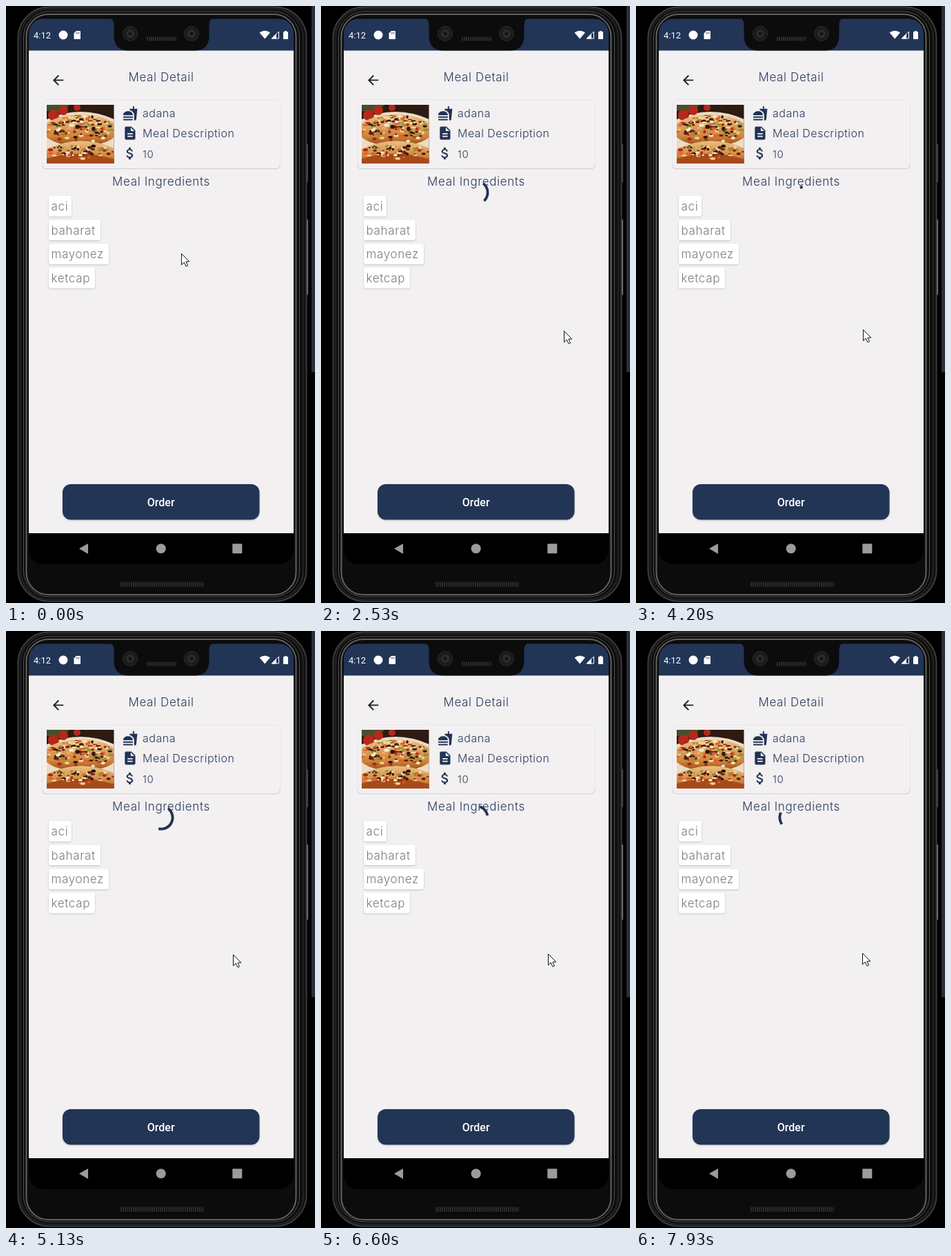
Animation of 448 by 864 pixels, one loop 8000 ms. Source, as an HTML page:

```html
<!DOCTYPE html>
<html lang="en">
<head>
<meta charset="utf-8">
<title>Meal Detail</title>
<style>
  html, body { margin: 0; width: 100%; height: 100%; overflow: hidden; background: #000; }
  svg { display: block; width: 100%; height: 100%; }
  .text { font: 300 17px Inter, sans-serif; letter-spacing: .65px; fill: #2b3b5c; }
  .small { font-size: 16px; letter-spacing: .5px; }
  .chip { fill: #7c7c7e; }
  .system { font-family: Roboto, sans-serif; fill: #fff; }
  .middle { text-anchor: middle; }
</style>
</head>
<body>
<svg viewBox="0 0 448 864">
  <defs>
    <filter id="shadow" x="-10%" y="-20%" width="120%" height="150%">
      <feDropShadow dx="0" dy="1" stdDeviation=".8" flood-opacity=".22"/>
    </filter>
    <clipPath id="screen"><rect x="33" y="18.500" width="384" height="789.500" rx="21"/></clipPath>
    <clipPath id="photo"><rect x="59" y="143" width="97.500" height="85"/></clipPath>
    <linearGradient id="crust" x2="0" y2="1">
      <stop stop-color="#e9c184"/><stop offset=".7" stop-color="#cf8238"/><stop offset="1" stop-color="#8b4216"/>
    </linearGradient>
  </defs>

  <!-- Phone body -->
  <rect width="448" height="864"/>
  <rect x="443" width="5" height="530" fill="#29303b"/>
  <rect x="434" y="200" width="4" height="55" rx="1" fill="#444"/>
  <rect x="434" y="309" width="4" height="109" rx="1" fill="#777"/>
  <g fill="#0c0c0c">
    <rect x="17.500" y="1.500" width="418" height="860" rx="45" stroke="#3c3c3c" stroke-width="2"/>
    <rect x="21" y="4" width="410" height="855" rx="42" stroke="#1f1f1f" stroke-width="3"/>
    <rect x="25.500" y="8" width="400" height="847" rx="37" stroke="#555"/>
    <rect x="29.500" y="12" width="391" height="840" rx="32" stroke="#626262" stroke-width="2"/>
  </g>
  <path d="M166 837H287" stroke="#2b2b2b" stroke-width="7" stroke-dasharray="2 1"/>

  <!-- Screen and status bar -->
  <g clip-path="url(#screen)">
    <rect x="33" y="18" width="384" height="790"/>
    <rect x="33" y="18" width="384" height="47" fill="#223557"/>
    <rect x="33" y="64.500" width="384" height="698.500" fill="#f2f0f1"/>
  </g>
  <path d="M150 17Q156.500 19 156.500 28V43Q156.500 64.500 178 64.500H273Q294.500 64.500 294.500 43V28Q294.500 19 301 17Z" fill="#0c0c0c"/>
  <g id="cameras"></g>
  <path d="M204 47.500H247" stroke="#2c2c2c" stroke-width="6" stroke-dasharray="2 1"/>
  <text class="system" x="40" y="46.500" font-size="13">4:12</text>
  <g fill="#fff">
    <circle cx="83" cy="42" r="6.500"/>
    <path d="M102 36H107Q108 36 108 37V47Q108 48 107 48H99.500Q98.500 48 98.500 47V39.500Z"/>
    <path d="M367.500 38.500Q375.500 33 383 38.500L375.300 47.500Z"/>
    <path d="M384.500 47.500L392 40V47.500Z"/>
    <path d="M395.500 37V47H385.500Z" fill="none" stroke="#fff"/>
    <path d="M404 36H407V37.300H409V48H402V37.300H404Z"/>
  </g>
  <path d="M102 38v2.500M104 38v2.500M106 38v2.500" stroke="#223557" stroke-width=".8"/>

  <!-- Navigation bar -->
  <g fill="#9b9b9b">
    <path d="M106 785.300L119 778V793Z"/>
    <circle cx="224.700" cy="785.300" r="7"/>
    <rect x="328.300" y="778.300" width="14" height="14" rx="1"/>
  </g>

  <!-- Header and meal card -->
  <path transform="translate(64.200 96)scale(.95)" fill="#202024"
    d="M20 11H7.830l5.590-5.590L12 4l-8 8 8 8 1.410-1.410L7.830 13H20z"/>
  <text class="text middle" x="225" y="109">Meal Detail</text>
  <rect x="52.500" y="135.500" width="345" height="100" rx="6" fill="#f2f0f1" stroke="#e8e6e8"/>
  <path d="M53 230Q53 235.500 58 235.500H392Q397 235.500 397 230" fill="none" stroke="#cfcdd0"/>
  <g id="pizza" clip-path="url(#photo)">
    <rect x="59" y="143" width="98" height="85" fill="#2d1a11"/>
    <path d="M59 143H92L82 154 59 152Z" fill="#44502a"/>
    <path d="M59 164Q108 142 157 164V214H59Z" fill="#eadcc6"/>
    <g fill="#b5281a">
      <circle cx="69" cy="158" r="8"/><circle cx="83" cy="151" r="7"/><circle cx="103" cy="147" r="5"/>
    </g>
    <ellipse cx="108" cy="180" rx="54" ry="23" fill="url(#crust)"/>
    <path d="M59 207Q108 184 157 206V228H59Z" fill="url(#crust)"/>
    <path d="M59 221Q108 206 157 222V228H59Z" fill="#a84a1a"/>
  </g>
  <g fill="#223455">
    <path transform="translate(169 144)scale(.93)"
      d="M18.060 22.990h1.660c.84 0 1.530-.64 1.630-1.460L23 5.050h-5V1h-1.970v4.050h-4.970l.3 2.340c1.710.47 3.310 1.320 4.270 2.260 1.440 1.420 2.430 2.890 2.430 5.290zM1 21.990V21h15.030v.99c0 .55-.45 1-1.010 1H2.010c-.56 0-1.010-.45-1.010-1zm15.030-7c0-8-15.030-8-15.030 0zM1.020 17h15v2h-15z"/>
    <path transform="translate(168.500 172.500)scale(.95)"
      d="M14 2H6c-1.100 0-2 .9-2 2v16c0 1.100.9 2 2 2h12c1.100 0 2-.9 2-2V8zm2 16H8v-2h8zm0-4H8v-2h8zm-3-5V3.500L18.500 9z"/>
    <path transform="translate(168.500 202)scale(.95)"
      d="M11.800 10.900c-2.270-.59-3-1.200-3-2.150 0-1.090 1.010-1.850 2.700-1.850 1.780 0 2.440.85 2.500 2.100h2.210c-.07-1.720-1.120-3.300-3.210-3.810V3h-3v2.160c-1.940.42-3.500 1.680-3.500 3.610 0 2.310 1.910 3.460 4.700 4.130 2.500.6 3 1.480 3 2.410 0 .69-.49 1.790-2.700 1.790-2.060 0-2.870-.92-2.980-2.100h-2.200c.12 2.190 1.760 3.420 3.680 3.830V21h3v-2.150c1.950-.37 3.500-1.500 3.500-3.550 0-2.840-2.430-3.810-4.700-4.400z"/>
  </g>
  <text class="text small" x="198" y="161">adana</text>
  <text class="text small" x="198" y="190">Meal Description</text>
  <text class="text small" x="198" y="219.500" style="font-size:15px">10</text>

  <text class="text middle" x="225" y="260">Meal Ingredients</text>
  <g id="chips"></g>

  <rect x="82" y="692" width="285.500" height="51.500" rx="12" fill="#223455" filter="url(#shadow)"/>
  <text class="system middle" x="224.700" y="724" font-size="16" font-weight="500">Order</text>

  <path id="spinner" fill="none" stroke="#223455" stroke-width="3.800" stroke-linecap="square"/>
  <path id="cursor" d="M.5.500V16.500L4.300 13 7 18.800 9.500 17.700 6.900 12H11.800Z" fill="#fff" stroke="#111"/>
</svg>
<script>
const LOOP = 8000, FRAME = 1000 / 15;
const byId = id => document.getElementById(id);
const add = (parent, markup) => byId(parent).insertAdjacentHTML('beforeend', markup);

for (const x of [180, 269]) {
  add('cameras', `<circle cx="${x}" cy="40" r="10.500" fill="#1b1b1b" stroke="#2b2b2b"/>
    <circle cx="${x}" cy="40" r="6" fill="#2c2c2c"/><circle cx="${x}" cy="40" r="2.500" fill="#141414"/>`);
}

[['aci', 33], ['baharat', 75], ['mayonez', 87], ['ketcap', 67]].forEach(([label, width], i) => {
  const y = 275 + i * 34.6;
  add('chips', `<rect x="62" y="${y}" width="${width}" height="29.500" rx="3" fill="#fff" filter="url(#shadow)"/>
    <text class="text chip" x="65.500" y="${y + 21}">${label}</text>`);
});

// Toppings scattered over both pizzas
let seed = 7;
const random = () => (seed = seed * 16807 % 2147483647) / 2147483647;
const toppings = ['#a92b18', '#f0d08c', '#24130f', '#f6e6c4', '#8a9433', '#5c2016', '#d9672c'];
for (let i = 0; i < 210; i++) {
  const angle = random() * 2 * Math.PI, reach = Math.sqrt(random());
  const upper = i % 3;
  const x = 108 + Math.cos(angle) * reach * 49;
  const y = (upper ? 178 : 211) + Math.sin(angle) * reach * (upper ? 19 : 10);
  add('pizza', `<ellipse cx="${x}" cy="${y}" rx="${1.3 + random() * 2.6}" ry="${.9 + random() * 1.4}"
    fill="${toppings[i % toppings.length]}"/>`);
}

// Eased value at x of a cubic bezier from (0,0) to (1,1)
function bezier(x1, y1, x2, y2, x) {
  const at = (a, b, u) => 3 * (1 - u) ** 2 * u * a + 3 * (1 - u) * u * u * b + u ** 3;
  let low = 0, high = 1;
  for (let i = 0; i < 20; i++) {
    const mid = (low + high) / 2;
    if (at(x1, x2, mid) < x) low = mid; else high = mid;
  }
  return at(y1, y2, low);
}

const SPIN_START = 1575, SPIN_CYCLE = 1333, SPIN_TURN = 2222;

function spinnerPath(time) {
  const age = time - SPIN_START;
  if (age < 0) return '';
  const phase = age / SPIN_CYCLE % 1;
  const tail = phase < .5 ? 0 : bezier(.4, 0, .2, 1, phase * 2 - 1);
  const head = phase < .5 ? bezier(.4, 0, .2, 1, phase * 2) : 1;
  const base = 90 * phase + 360 * age / SPIN_TURN;
  const point = degrees => {
    const a = degrees * Math.PI / 180;
    return `${225 + 16.6 * Math.sin(a)} ${270 - 16.6 * Math.cos(a)}`;
  };
  const sweep = Math.max(.5, 270 * (head - tail));
  const start = base + 270 * tail;
  return `M${point(start)}A16.6 16.6 0 ${sweep > 180 ? 1 : 0} 1 ${point(start + sweep)}`;
}

// Pointer stops: time, x, y
const stops = [
  [0, 254, 358], [1250, 208, 705], [1530, 208, 705], [2400, 352, 470], [2600, 352, 470],
  [3100, 329, 468], [5800, 329, 468], [6000, 329, 467], [7000, 329, 467], [7200, 328, 466], [LOOP, 328, 466]
];

function pointerAt(time) {
  const next = stops.findIndex(stop => stop[0] > time);
  const [t0, x0, y0] = stops[next - 1], [t1, x1, y1] = stops[next];
  const u = (time - t0) / (t1 - t0), eased = u * u * (3 - 2 * u);
  return [x0 + (x1 - x0) * eased, y0 + (y1 - y0) * eased].map(Math.round);
}

// The picture advances in whole steps of FRAME
function draw(now) {
  const time = Math.floor((now % LOOP + 3.4) / FRAME) * FRAME % LOOP;
  byId('spinner').setAttribute('d', spinnerPath(time));
  byId('cursor').setAttribute('transform', `translate(${pointerAt(time)})`);
  requestAnimationFrame(() => draw(performance.now() - begin));
}
const begin = performance.now();
draw(0);
</script>
</body>
</html>
```
